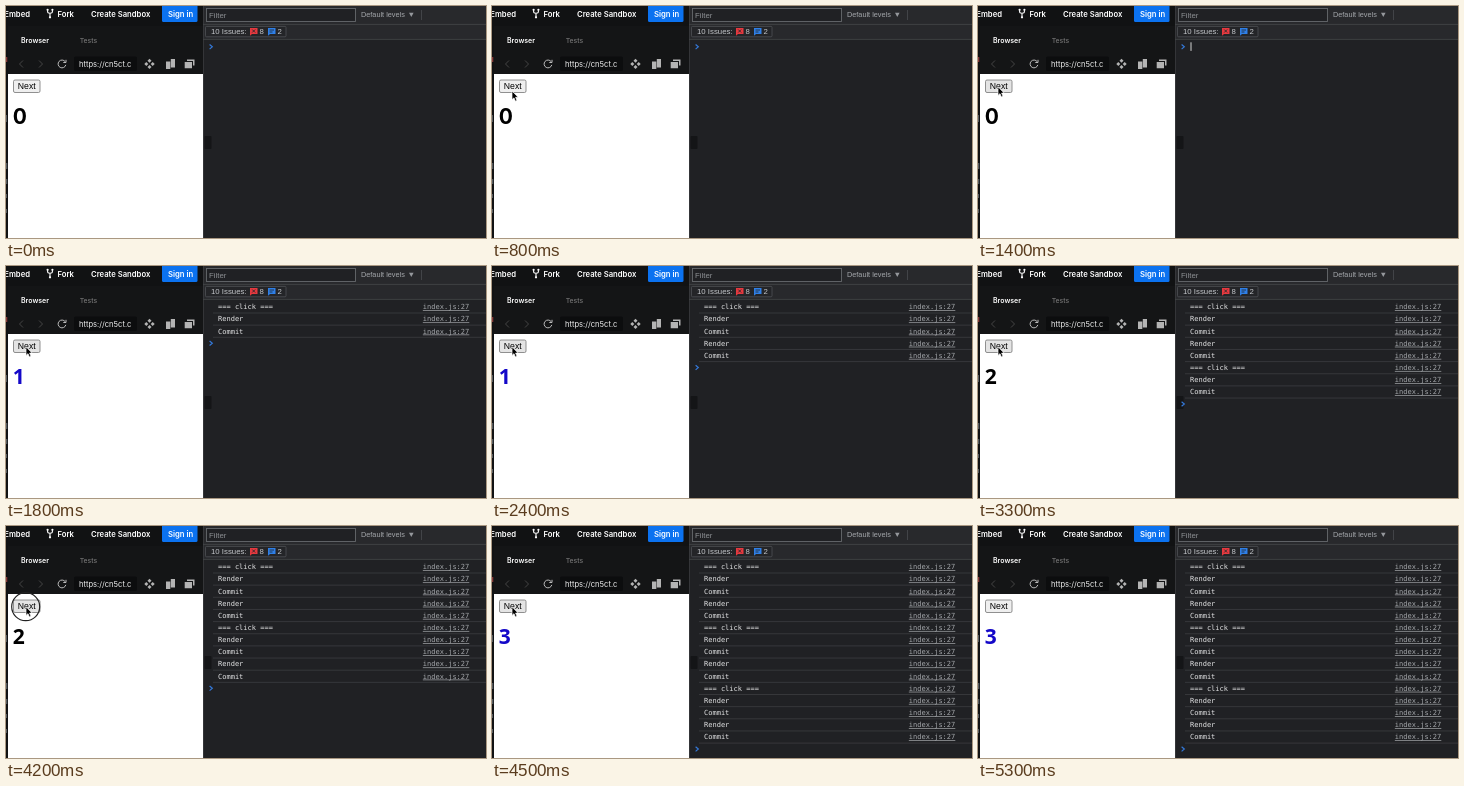
An HTML page for the animation above (5600 ms loop, 480 px wide and 232 px high).

```html
<!DOCTYPE html>
<html lang="en">
<head>
<meta charset="utf-8">
<title>Render and commit log</title>
<style>
html, body { margin: 0; width: 100%; height: 100%; overflow: hidden; background: #202124; }
svg { display: block; width: 480px; height: 232px; }
text { white-space: pre; }
.ui { font-family: Inter, sans-serif; font-size: 7.7px; font-weight: 600; fill: #fff; }
.tool { font-family: "Liberation Sans", Arial, sans-serif; font-size: 7.8px; fill: #c4c7cb; }
.log { font-family: "DejaVu Sans Mono", monospace; font-size: 7.02px; fill: #e4e5e6; }
.link { fill: #a5a8ac; text-decoration: underline; }
.icon { fill: none; stroke: #aaa; stroke-width: 1; }
.count { font-size: 21px; font-weight: 700; }
</style>
</head>
<body>
<svg viewBox="0 0 480 232" xmlns="http://www.w3.org/2000/svg">
  <defs><clipPath id="urlClip"><rect x="70" y="48" width="55.5" height="20"/></clipPath></defs>

  <!-- sandbox -->
  <rect width="197" height="232" fill="#111213"/>
  <g fill="#555a5e">
    <rect y="51" width="1.3" height="5" fill="#8b3a3a"/>
    <rect y="109" width="1" height="7"/>
    <rect y="157" width="1.3" height="6"/>
    <rect y="173" width="1.3" height="5"/>
    <rect y="188" width="1" height="4"/>
    <rect y="203" width="1" height="4"/>
  </g>
  <rect x="2" y="20" width="195" height="48" fill="#141516"/>
  <g class="ui">
    <text x="24" y="10.6" text-anchor="end">Embed</text>
    <text x="51.5" y="10.6">Fork</text>
    <text x="85" y="10.6">Create Sandbox</text>
    <rect x="156" y="-3" width="35.5" height="19" rx="1.5" fill="#0b72f0"/>
    <text x="162" y="10.6">Sign in</text>
    <text x="15" y="37.4" font-size="7" style="font-size:7px">Browser</text>
    <text x="73.7" y="37.4" style="font-size:6.8px;font-weight:500;fill:#757575">Tests</text>
    <rect x="68" y="50.5" width="63" height="14.5" rx="1.5" fill="#0c0d0e"/>
    <text x="73" y="60.6" clip-path="url(#urlClip)" style="font-size:7.6px;font-weight:400;fill:#eee">https://cn5ct.csb.app/</text>
  </g>
  <g class="icon">
    <path d="M41.6 4.2v1.6q0 1.4 2.4 1.4t2.4-1.4v-1.6M44 7.2v4.2" stroke="#fff" stroke-width="1.1"/>
    <g fill="#fff" stroke="none"><circle cx="41.6" cy="3.8" r="1.1"/><circle cx="46.4" cy="3.8" r="1.1"/><circle cx="44" cy="11.3" r="1.1"/></g>
    <path d="M17 54.5l-3.5 3.5 3.5 3.5M33 54.5l3.5 3.5-3.5 3.5" stroke="#454545"/>
    <path d="M59.2 55.7a3.9 3.9 0 1 0 .6 3.2M60 53.8v2.7h-2.7" stroke="#bbb"/>
    <g fill="#b4b4b4" stroke="none">
      <path d="M143.5 52.7l2 2-2 2-2-2zM143.5 59.1l2 2-2 2-2-2zM140.3 55.9l2 2-2 2-2-2zM146.7 55.9l2 2-2 2-2-2z"/>
      <path d="M160 55.5h4.3v7.5H160zM164.8 53h4.2v8.5h-4.2z"/>
      <path d="M181 53.5h7.5v6H187v-4.5h-6zM178.7 56h7.3v6.2h-7.3z"/>
    </g>
  </g>
  <rect x="2" y="68" width="195" height="164" fill="#fff"/>
  <rect id="button" x="7.5" y="74" width="26.5" height="12.5" rx="1.5" stroke="#777" stroke-width=".8"/>
  <text class="tool" x="11.8" y="83.3" style="font-size:8.7px;fill:#000">Next</text>
  <text id="count" class="count" x="6.7" y="118"></text>

  <!-- console -->
  <rect x="197" width="283" height="232" fill="#202124"/>
  <rect x="197" width="283" height="33" fill="#28292c"/>
  <path d="M197.5 0V232" stroke="#3a3b3e" stroke-width=".8"/>
  <path d="M197 18.4H480M197 33.4H480" stroke="#45474a" stroke-width=".8"/>
  <rect x="200.5" y="2.5" width="149" height="13" fill="#202124" stroke="#66696d" stroke-width=".9"/>
  <path d="M415.5 4v10" stroke="#4a4c50" stroke-width=".8"/>
  <rect x="199.5" y="20.4" width="80.5" height="10.4" rx="1" fill="#242528" stroke="#505256" stroke-width=".8"/>
  <g class="tool">
    <text x="203" y="12.2" style="fill:#8d9094">Filter</text>
    <text x="355" y="11.3" style="font-size:7.3px;fill:#a4a7ab">Default levels</text>
    <path d="M403 6.8h4.6l-2.3 4.2z" fill="#95989c"/>
    <text x="205" y="28.3">10 Issues:</text>
    <text x="253.6" y="28.3">8</text>
    <text x="271.6" y="28.3">2</text>
  </g>
  <path d="M244 22h7.5v6h-5.5l-2 1.8z" fill="#e5393f"/>
  <path d="M246.2 23.5l3 3m0-3l-3 3" stroke="#28292c" stroke-width=".9"/>
  <path d="M262 22h7.5v6H264l-2 1.8z" fill="#2f7fe6"/>
  <path d="M263.5 24h4.5M263.5 26h3" stroke="#202124" stroke-width=".8"/>
  <rect x="198.5" y="130" width="7" height="13" rx="1" fill="#141517"/>
  <g id="rows"></g>
  <path id="prompt" d="M203.6 -2.3l2.7 2.3-2.7 2.3" fill="none" stroke="#3478d8" stroke-width="1.2"/>
  <path id="caret" d="M213 36.3v8.6" stroke="#e8e8e8" stroke-width=".9"/>

  <!-- pointer -->
  <circle id="ring" cx="19.7" cy="80.7" r="14" fill="none" stroke="#222" stroke-width="1.2"/>
  <path id="pointer" d="M0 0V8.6L2 6.9 3.4 10.2 5 9.5 3.6 6.3H6.2z" fill="#000" stroke="#fff" stroke-width=".7"/>
</svg>
<script>
const LOOP = 5600, STEP = 100, PITCH = 12.15, FIRST = 40.8;
const LINES = ["=== click ===", "Render", "Commit", "Render", "Commit"];
// each click: ring shown, first commit, second commit
const CLICKS = [[1600, 1800, 1900], [3000, 3300, 3500], [4000, 4300, 4500]];
// pointer path: time, x, y
const PATH = [[100, 62, 176], [600, 22, 92], [800, 20, 85], [1200, 20, 85],
  [1400, 20, 80.8], [4500, 20, 80.8], [4900, 46, 192]];

const $ = id => document.getElementById(id);
const show = (el, on) => el.setAttribute("visibility", on ? "visible" : "hidden");

const rowMarkup = i => {
  const y = FIRST + i * PITCH;
  return `<g class="log"><text x="212" y="${y + 2.4}">${LINES[i % LINES.length]}</text>
    <text class="link" x="463.3" y="${y + 2.4}" text-anchor="end">index.js:27</text>
    <path d="M207 ${y + 6.2}H480" stroke="#3b3d41" stroke-width=".8"/></g>`;
};
$("rows").innerHTML = Array.from({ length: CLICKS.length * LINES.length }, (_, i) => rowMarkup(i)).join("");
const rows = [...$("rows").children];

function pointerAt(t) {
  const k = PATH.findIndex(p => p[0] > t);
  if (k < 1) return null;
  const [t0, x0, y0] = PATH[k - 1], [t1, x1, y1] = PATH[k];
  const u = (t - t0) / (t1 - t0), e = u * u * (3 - 2 * u);
  return [x0 + (x1 - x0) * e, y0 + (y1 - y0) * e];
}

function draw(time) {
  const t = Math.floor((time % LOOP) / STEP) * STEP;
  let count = 0, lines = 0;
  for (const [, first, second] of CLICKS) {
    if (t >= first) { count++; lines += 3; }
    if (t >= second) lines += 2;
  }
  rows.forEach((row, i) => show(row, i < lines));
  $("prompt").setAttribute("transform", `translate(0 ${FIRST + lines * PITCH})`);
  show($("caret"), t >= 1400 && t < 1600);
  show($("ring"), CLICKS.some(([down, up]) => t >= down && t < up));

  const label = $("count");
  label.textContent = count;
  label.setAttribute("fill", count % 2 ? "#1408c8" : "#000");
  label.setAttribute("font-family", count ? "'Open Sans', sans-serif" : "Inter, sans-serif");

  const pos = pointerAt(t);
  show($("pointer"), pos);
  if (pos) $("pointer").setAttribute("transform", `translate(${pos})`);
  const hover = pos && pos[1] < 84;
  $("button").setAttribute("fill", hover ? "#e4e4e4" : "#efefef");
}

const start = performance.now();
function tick() {
  draw(performance.now() - start);
  requestAnimationFrame(tick);
}
tick();
</script>
</body>
</html>
```
